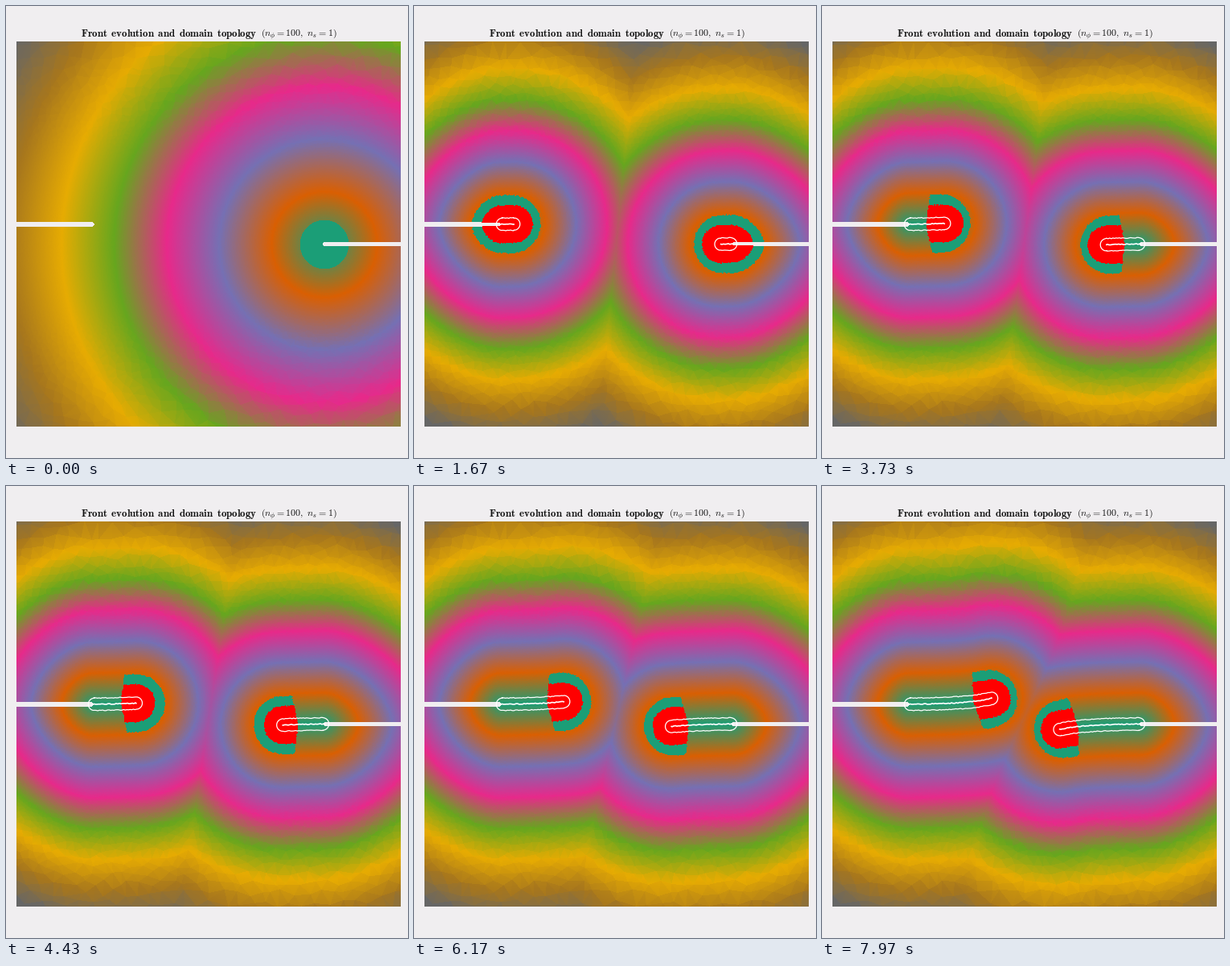
These frames come from a looping animation (500x561 px, 8 s). A matplotlib script:

```python
import numpy as np
import matplotlib.pyplot as plt
from matplotlib.animation import FuncAnimation
from matplotlib.tri import Triangulation

W, H, DPI = 500, 561, 100
LEFT, TOP, SIDE = 13, 44, 478
FRAMES, LOOP = 240, 8000
BG = (240, 238, 240)
TEAL, RED = (27, 158, 119), (255, 0, 0)
BAND = 38.6          # distance covered by one colour step
FAR = 457            # largest distance in the opening frame
CUT_START = 65       # frame where the tube stops covering the old tip

plt.rcParams["mathtext.fontset"] = "cm"
rng = np.random.default_rng(4)


def make_lut(n=1024):
    dark2 = np.array(plt.get_cmap("Dark2").colors) * 255
    pos = np.linspace(0, 7, n)
    cols = [np.interp(pos, np.arange(8), dark2[:, k]) for k in range(3)]
    return np.stack(cols, axis=1).round().astype(np.uint8)


def mesh_samples(px, py, blend=0.6):
    """Pull each pixel towards the centre of its mesh triangle."""
    pts, y = [], TOP - 30.0
    while y < TOP + SIDE + 40:
        h = 3 + 0.095 * max(0, abs(y - 283) - 95)
        xs = np.arange(LEFT - 30, LEFT + SIDE + 40, h) + rng.uniform(0, h)
        row = np.stack([xs, np.full(xs.size, y)], axis=1)
        pts.append(row + rng.uniform(-0.33, 0.33, row.shape) * h)
        y += 0.9 * h
    pts = np.concatenate(pts)
    tri = Triangulation(pts[:, 0], pts[:, 1])
    idx = tri.get_trifinder()(px, py)
    mid = pts[tri.triangles].mean(axis=1)[idx]
    sx = px + blend * (mid[..., 0] - px)
    sy = py + blend * (mid[..., 1] - py)
    return sx.astype(np.float32), sy.astype(np.float32)


def bend(s):
    return 0.02 * s + 5.4 * (s / 104) ** 4


def slope(s):
    return 0.02 + 21.6 * s ** 3 / 104 ** 4


class Crack:
    """A notch whose tip advances along a slowly bending path."""

    def __init__(self, x0, y0, sign, reach, speed, squeeze):
        self.x0, self.y0, self.sign = x0, y0, sign
        self.reach, self.speed = reach, speed
        self.u = (SX - x0) * sign
        self.v = (SY - y0) * sign
        self.near = np.zeros_like(self.u)
        best = np.full_like(self.u, np.inf)
        for s in range(0, 107):
            d = (self.u - s) ** 2 + (self.v + bend(s)) ** 2
            closer = d < best
            best[closer] = d[closer]
            self.near[closer] = s
        self.near_bend = bend(self.near).astype(np.float32)
        self.behind = self.u < 0
        p = 1.7
        self.back = ((squeeze * np.abs(self.u)) ** p + np.abs(self.v) ** p) ** (1 / p)
        self.wobble = rng.uniform(-0.5, 0.5, (3, 60))

    def length(self, n):
        return max(1.5, self.reach + self.speed * (n - 91))

    def dist(self, s):
        du = self.u - np.minimum(self.near, np.float32(s))
        dv = self.v + np.minimum(self.near_bend, np.float32(bend(s)))
        return np.where(self.behind, self.back, np.sqrt(du * du + dv * dv))

    def ahead(self, s):
        """Area in front of the kinked rear edge of the tube."""
        a = np.arctan(slope(s))
        du, dv = self.u - s, self.v + bend(s)
        along = du * np.cos(a) - dv * np.sin(a)
        across = du * np.sin(a) + dv * np.cos(a)
        return along > -19 + np.abs(across) / 6

    def notch(self, shift, half):
        over = np.maximum((PX - self.x0) * self.sign - shift, 0)
        return np.hypot(over, PY - self.y0) < half

    def place(self, u, v):
        return self.x0 + self.sign * u, self.y0 + self.sign * v

    def centre_line(self, s):
        t = np.append(np.arange(0, s, 2.0), s)
        return self.place(t, -bend(t) + self.wobble[0, :t.size])

    def outline(self, s, r=7.7):
        t = np.append(np.arange(3, max(s, 3.5), 2.0), max(s, 4))
        a = np.arctan(slope(t))
        up = r + self.wobble[1, :t.size]
        low = r + self.wobble[2, :t.size]
        arc = np.linspace(-np.pi / 2, np.pi / 2, 13)[1:-1]
        front = arc - a[-1]
        rear = arc + np.pi - a[0]
        u = np.concatenate([t - up * np.sin(a), t[-1] + r * np.cos(front),
                            (t + low * np.sin(a))[::-1], t[0] + r * np.cos(rear)])
        v = np.concatenate([-bend(t) - up * np.cos(a),
                            -bend(t[-1]) + r * np.sin(front),
                            (-bend(t) + low * np.cos(a))[::-1],
                            -bend(t[0]) + r * np.sin(rear)])
        return self.place(np.append(u, u[0]), np.append(v, v[0]))


PX, PY = np.meshgrid(np.arange(SIDE) + LEFT + 0.5, np.arange(SIDE) + TOP + 0.5)
SX, SY = mesh_samples(PX, PY)
LUT = make_lut()
cracks = [Crack(107, 271, 1, 36, 0.4595, 1.02),
          Crack(397, 295.3, -1, 34, 0.455, 0.93)]
full_notch = [c.notch(-1, 2.8) for c in cracks]
thin_notch = [c.notch(-1, 1.9) for c in cracks]


def shade(d, band):
    idx = d * np.float32((len(LUT) - 1) / (7 * band))
    return LUT[np.minimum(idx, len(LUT) - 1).astype(np.int32)]


def opening():
    d = np.hypot(SX - 396, SY - 296)
    img = shade(d, FAR / 7)
    img[np.hypot(PX - 396, PY - 296) < 30.3] = TEAL
    img[cracks[0].notch(0, 2.8) | cracks[1].notch(0, 2.8)] = BG
    return img


def field(n):
    if n == 0:
        return opening()
    # the tube is rebuilt around the tip at regular intervals
    anchor = 132 + 9.78 * np.floor((n - 132) / 9.78)
    dists, tubes, cores = [], [], []
    for c in cracks:
        base = c.length(anchor)
        d = c.dist(c.length(n))
        tube, core = c.dist(base) < 36, d < 23.5
        if n >= CUT_START:
            ahead = c.ahead(base)
            tube &= ahead
            core &= ahead
        dists.append(d)
        tubes.append(tube)
        cores.append(core)
    img = shade(np.minimum(*dists), BAND)
    core = cores[0] | cores[1]
    img[tubes[0] | tubes[1]] = TEAL
    img[core] = RED
    for full, thin in zip(full_notch, thin_notch):
        img[thin | (full & ~core)] = BG
    return img


fig = plt.figure(figsize=(W / DPI, H / DPI), dpi=DPI,
                 facecolor=tuple(v / 255 for v in BG))
picture = fig.figimage(opening(), LEFT, H - TOP - SIDE, origin="upper")
ax = fig.add_axes([0, 0, 1, 1], zorder=2)
ax.set(xlim=(0, W), ylim=(H, 0))
ax.axis("off")

ax.text(93, 38, r"$\mathbf{Front}\ \,\mathbf{evolution}\ \,\mathbf{and}"
        r"\ \,\mathbf{domain}\ \,\mathbf{topology}$",
        size=9.3, va="baseline", color="#111111")
ax.text(317, 38, r"$(n_\phi = 100,\ n_s = 1)$", size=8.6,
        va="baseline", color="#111111")

edges = [ax.plot([], [], color="white", lw=0.9)[0] for _ in cracks]
cores = [ax.plot([], [], color="white", lw=1.2)[0] for _ in cracks]


def draw(n):
    picture.set_data(field(n))
    for c, edge, core in zip(cracks, edges, cores):
        s = c.length(n)
        edge.set_data(*(c.outline(s) if n else ([], [])))
        core.set_data(*(c.centre_line(s) if n else ([], [])))
    return [picture, *edges, *cores]


anim = FuncAnimation(fig, draw, frames=FRAMES, interval=LOOP / FRAMES,
                     init_func=lambda: draw(0), repeat=True, repeat_delay=0)
plt.show()
```
